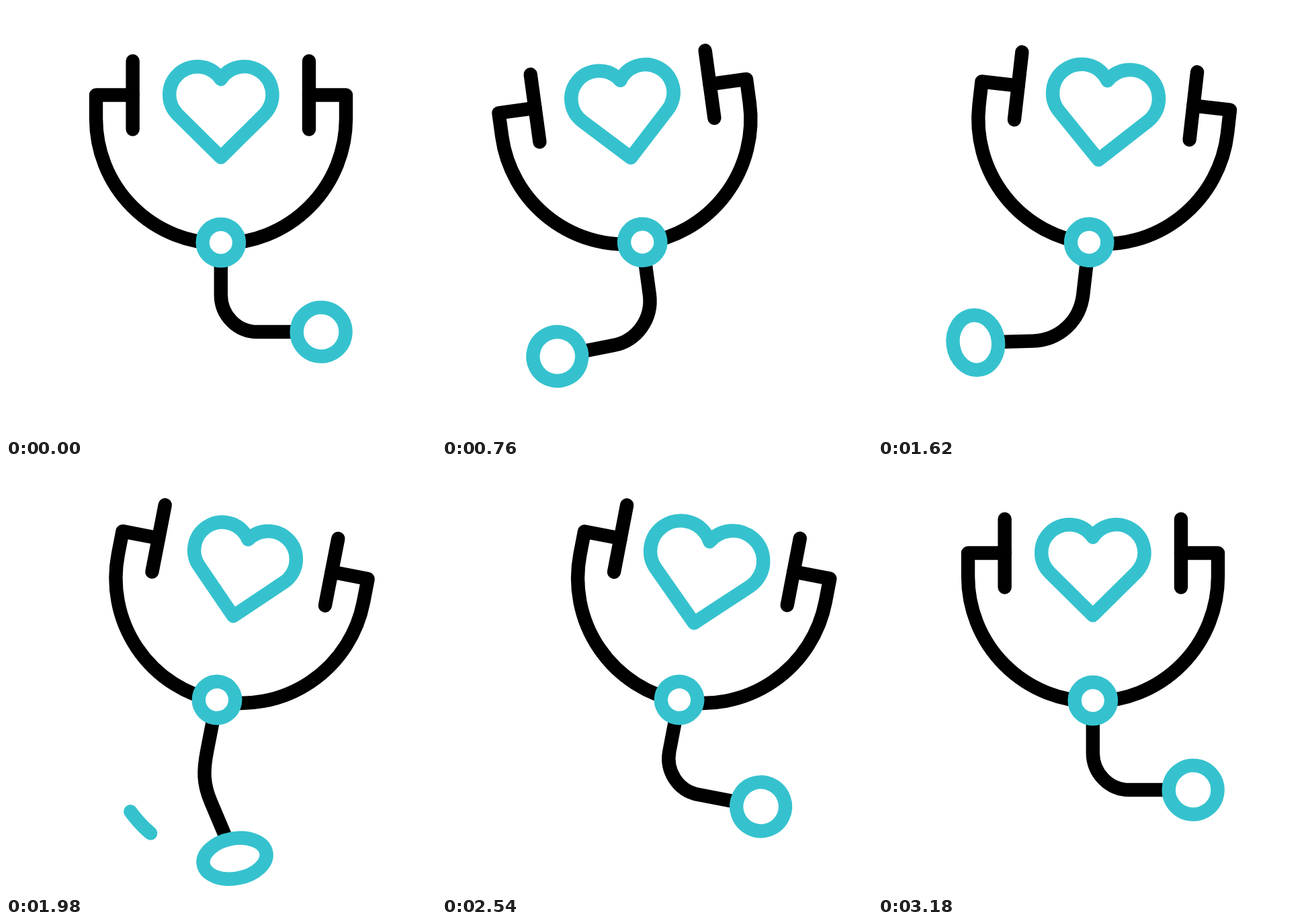
These frames come from a looping animation (640x640 px, 3.2 s). An HTML page with a canvas:

```html
<!DOCTYPE html>
<html lang="en">
<head>
<meta charset="utf-8">
<title>Stethoscope</title>
<style>
html, body { margin: 0; width: 100%; height: 100%; overflow: hidden; background: #fff; }
canvas { display: block; width: 640px; height: 640px; }
</style>
</head>
<body>
<canvas id="stage" width="640" height="640"></canvas>
<script>
const ctx = document.getElementById('stage').getContext('2d');
const LOOP = 3200, BEAT = 1060, RETURN = 1610;
const BLACK = '#000', TEAL = '#35c2ce', WHITE = '#fff';
const RAD = Math.PI / 180;
const PX = 319.8, PY = 352;

const clamp = (v, lo, hi) => Math.min(hi, Math.max(lo, v));

// Smooth step from 0 at time a to 1 at time b
function ease(a, b, t) {
  const u = clamp((t - a) / (b - a), 0, 1);
  return u * u * (3 - 2 * u);
}

// Rises from a to b, falls back from b to c
const hump = (a, b, c, t) => ease(a, b, t) - ease(b, c, t);

// A fast throw that settles slowly
const swing = t => 0.68 * ease(80, 420, t) + 0.32 * ease(300, 820, t);

function pose(t) {
  const out = swing(t), back = swing(t - RETURN);
  const left = out - back;
  const lift = hump(0, 310, 690, t) + hump(1410, 1920, 2300, t);
  const drift = 3.5 * (ease(1200, 1600, t) - back);
  return {
    shift: 43.6 * hump(1870, 2485, 3150, t) - 36.4 * hump(0, 560, 1220, t),
    tilt: 11 * (ease(1220, 1934, t) - ease(2500, 3150, t)) - 10 * hump(0, 560, 1220, t),
    angle: 48.3 - 93.8 * left + drift,
    reach: 200 + 12 * left + 36 * lift,
    arm: 95 - 10 * left,
    stretch: 0.33 * lift,
  };
}

function pulse(t) {
  const u = Math.min(1, (t % BEAT) / 620);
  return 1.18 * Math.sin(Math.PI * u ** 0.85);
}

function stroke(color, build, fill) {
  ctx.beginPath();
  build();
  if (fill) {
    ctx.fillStyle = fill;
    ctx.fill();
  }
  ctx.strokeStyle = color;
  ctx.stroke();
}

function line(...p) {
  ctx.moveTo(p[0], p[1]);
  for (let i = 2; i < p.length; i += 2) ctx.lineTo(p[i], p[i + 1]);
}

function drawTube() {
  stroke(BLACK, () => {
    line(188.6, 132.5, 134, 132.5, 134, 167.5);
    ctx.arc(320, 167.5, 186, Math.PI, 0, true);
    ctx.lineTo(506, 132.5);
    ctx.lineTo(451, 132.5);
  });
  for (const x of [188.6, 451]) stroke(BLACK, () => line(x, 82, x, 183.5));
}

function drawHose(x, y, turn, arm) {
  const dx = Math.sin(turn), dy = Math.cos(turn);
  const qx = x - arm * dx, qy = y - arm * dy, top = PY + 78;
  const h = 0.39 * Math.hypot(qx - PX, qy - top);
  stroke(BLACK, () => {
    line(PX, PY, PX, top);
    ctx.bezierCurveTo(PX, top + h, qx - h * dx, qy - h * dy, qx, qy);
    ctx.lineTo(x, y);
  });
}

function drawHeart(h) {
  const r = 41.7 + 3.9 * h, c = 34.8 + 5.2 * h, tip = 93.1 + 9 * h;
  const cy = 131.9 + 2.5 * h;
  const notch = Math.acos(c / r);
  const side = Math.asin(r / Math.hypot(c, tip)) + Math.atan(c / tip);
  stroke(TEAL, () => {
    ctx.moveTo(PX, cy + tip);
    ctx.arc(PX - c, cy, r, Math.PI - side, -notch);
    ctx.arc(PX + c, cy, r, Math.PI + notch, side);
    ctx.closePath();
  });
}

function drawTrail(t, dir) {
  const head = 40 - 48 * ease(250, 620, t), tail = 40 - 48 * ease(340, 740, t);
  if (tail - head < 0.3) return;
  stroke(TEAL, () => {
    for (let i = 0; i <= 16; i++) {
      const w = tail + (head - tail) * i / 16;
      const r = 239.5 - 0.107 * Math.abs(w) ** 1.5;
      ctx.lineTo(320 + dir * r * Math.sin(w * RAD), 352 + r * Math.cos(w * RAD));
    }
  });
}

function draw(t) {
  ctx.fillStyle = WHITE;
  ctx.fillRect(0, 0, 640, 640);
  ctx.lineWidth = 20.4;
  ctx.lineCap = ctx.lineJoin = 'round';
  drawTrail(t, 1);
  drawTrail(t - RETURN, -1);

  const { shift, tilt, angle, reach, arm, stretch } = pose(t);
  const x = PX + reach * Math.sin(angle * RAD), y = PY + reach * Math.cos(angle * RAD);
  const turn = clamp(1.95 * angle, -90, 90);
  const spin = -1.7 * (angle - tilt) - tilt;

  ctx.save();
  ctx.translate(320 + shift, 302);
  ctx.rotate(tilt * RAD);
  ctx.translate(-320, -302);
  drawHose(x, y, turn * RAD, arm);
  drawTube();
  stroke(TEAL, () => ctx.arc(PX, PY, 27.2, 0, 2 * Math.PI), WHITE);
  stroke(TEAL, () => ctx.ellipse(x, y, 36.4 * (1 + stretch), 36.4 * (1 - 0.6 * stretch),
    spin * RAD, 0, 2 * Math.PI), WHITE);
  drawHeart(pulse(t));
  ctx.restore();
}

const start = performance.now();
function tick(now) {
  draw(Math.max(0, now - start) % LOOP);
  requestAnimationFrame(tick);
}
draw(0);
requestAnimationFrame(tick);
</script>
</body>
</html>
```
